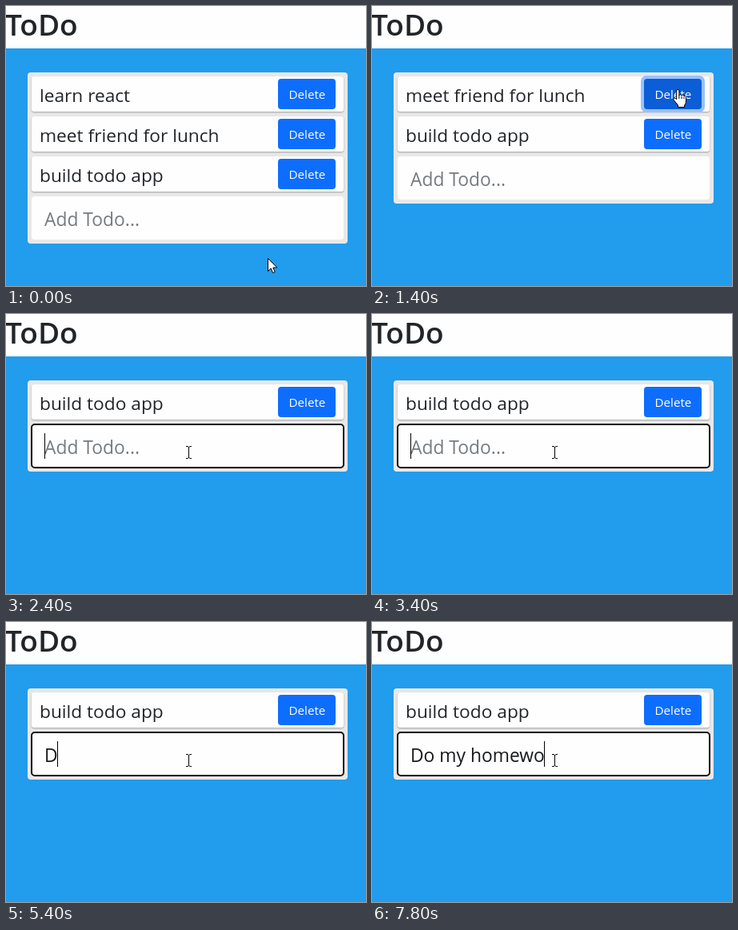
Write an HTML page with a canvas that moves like this. It is 450 px wide and 350 px high and loops after 8000 ms.

```html
<!DOCTYPE html>
<html lang="en">
<head>
<meta charset="utf-8">
<title>ToDo</title>
<style>
  html, body { margin: 0; width: 100%; height: 100%; overflow: hidden; background: #229cec; }
  canvas { display: block; }
</style>
</head>
<body>
<canvas width="450" height="350"></canvas>
<script>
const ctx = document.querySelector('canvas').getContext('2d');
const LOOP = 8000, STEP = 200, ROW = 50;
const FONT = '"Open Sans", "Noto Sans", sans-serif';
const TODOS = ['learn react', 'meet friend for lunch', 'build todo app'];
const TYPED = 'Do my homewo';

// Pointer shapes, each with its hot spot at 0,0
const ARROW = new Path2D('M.5 .5V16.5L4.2 13L6.7 18.6L9.2 17.5L6.8 12H11.8Z');
const HAND = new Path2D('M-1.3 13V2a1.6 1.6 0 0 1 3.2 0V8a1.6 1.6 0 0 1 3.1 0a1.6 1.6 0 0 1 3 .8' +
  'a1.5 1.5 0 0 1 2.5 1.4V15q0 3-1.8 5v2.5H.5V20L-5 13.3q-.8-2.2 1.2-2.4Q-2.2 11-1.3 13Z');
const KNUCKLES = new Path2D('M1.9 8V12M5 8.5V12M8 9.5V12');
const IBEAM = new Path2D('M-3 -7.5H-1L.5 -6.5L2 -7.5H4M.5 -6.5V6.5M-3 7.5H-1L.5 6.5L2 7.5H4');

// Pointer keys: time, x, y
const MOVES = [[0, 327, 315], [1200, 382, 104], [2000, 382, 104], [2400, 228, 173], [LOOP, 228, 173]];

function pointerAt(t) {
  const i = MOVES.findIndex(m => t < m[0]);
  const [t0, x0, y0] = MOVES[i - 1], [t1, x1, y1] = MOVES[i];
  const p = (t - t0) / (t1 - t0), e = p * p * (3 - 2 * p);
  return [Math.round(x0 + (x1 - x0) * e), Math.round(y0 + (y1 - y0) * e)];
}

function typedCount(t) {
  if (t < 4200) return 0;
  if (t < 5600) return 1;
  return t < 6200 ? Math.min(3, (t - 5200) / STEP) : (t - 5400) / STEP;
}

const caretOn = t => t >= 2400 && t < 2800 || t >= 3400 && t < 4000 ||
  t >= 4200 && t < 4800 || t >= 5400;

const inside = (x, y, l, t, w, h) => x >= l && x < l + w && y >= t && y < t + h;

function box(x, y, w, h, r, fill) {
  ctx.beginPath();
  ctx.roundRect(x, y, w, h, r);
  ctx.fillStyle = fill;
  ctx.fill();
}

function text(s, x, y, size, fill, weight = 400) {
  ctx.font = `${weight} ${size}px ${FONT}`;
  ctx.fillStyle = fill;
  ctx.fillText(s, x, y);
}

function drawRow(label, y, hover, focus) {
  ctx.save();
  ctx.shadowColor = 'rgba(0,0,0,.3)';
  ctx.shadowBlur = 2;
  ctx.shadowOffsetY = 1;
  box(32, y, 390, 44, 3, '#fefefe');
  ctx.restore();
  text(label, 42, y + 32, 22.7, '#212529');
  if (focus) box(336, y - 1, 80, 46, 7, '#98c1fe');
  box(340, y + 3, 72, 38, 4, hover ? '#0b5ed7' : '#0d6efd');
  text('Delete', 353.5, y + 28, 15.2, '#fff');
}

function drawInput(y, t) {
  box(32, y, 390, 54, 4, '#fefefe');
  if (t >= 2400) {
    ctx.strokeStyle = '#101010';
    ctx.lineWidth = 2;
    ctx.stroke();
  }
  const value = TYPED.slice(0, typedCount(t));
  text(value || 'Add Todo...', 48, y + 37, 22.8, value ? '#16181b' : '#757b80');
  if (caretOn(t)) {
    ctx.fillStyle = '#000';
    ctx.fillRect(48 + Math.floor(value && ctx.measureText(value).width), y + 11, 1, 32);
  }
}

function drawPointer(shape, x, y) {
  ctx.save();
  ctx.translate(x, y);
  ctx.lineWidth = 1;
  ctx.strokeStyle = '#000';
  ctx.fillStyle = '#fff';
  if (shape !== IBEAM) ctx.fill(shape);
  ctx.stroke(shape);
  if (shape === HAND) ctx.stroke(KNUCKLES);
  ctx.restore();
}

function draw(t) {
  const items = TODOS.slice(t < 1400 ? 0 : t < 2000 ? 1 : 2);
  const inputY = 88 + items.length * ROW;
  const [px, py] = pointerAt(t);
  let shape = inside(px, py, 32, inputY, 390, 54) ? IBEAM : ARROW;

  ctx.fillStyle = '#229cec';
  ctx.fillRect(0, 0, 450, 350);
  ctx.fillStyle = '#fefefe';
  ctx.fillRect(0, 0, 450, 53);
  text('ToDo', -1, 37, 37, '#212529', 600);

  box(27, 83, 400, inputY - 24, 4, '#e8e8e8');
  items.forEach((label, i) => {
    const y = 88 + i * ROW;
    const hover = inside(px, py, 340, y + 3, 72, 38);
    if (hover) shape = HAND;
    drawRow(label, y, hover, i === 0 && t >= 1400 && t < 2400);
  });
  drawInput(inputY, t);
  drawPointer(shape, px, py);
}

function tick(now) {
  draw(Math.floor(now % LOOP / STEP) * STEP);
  requestAnimationFrame(tick);
}
tick(0);
</script>
</body>
</html>
```
